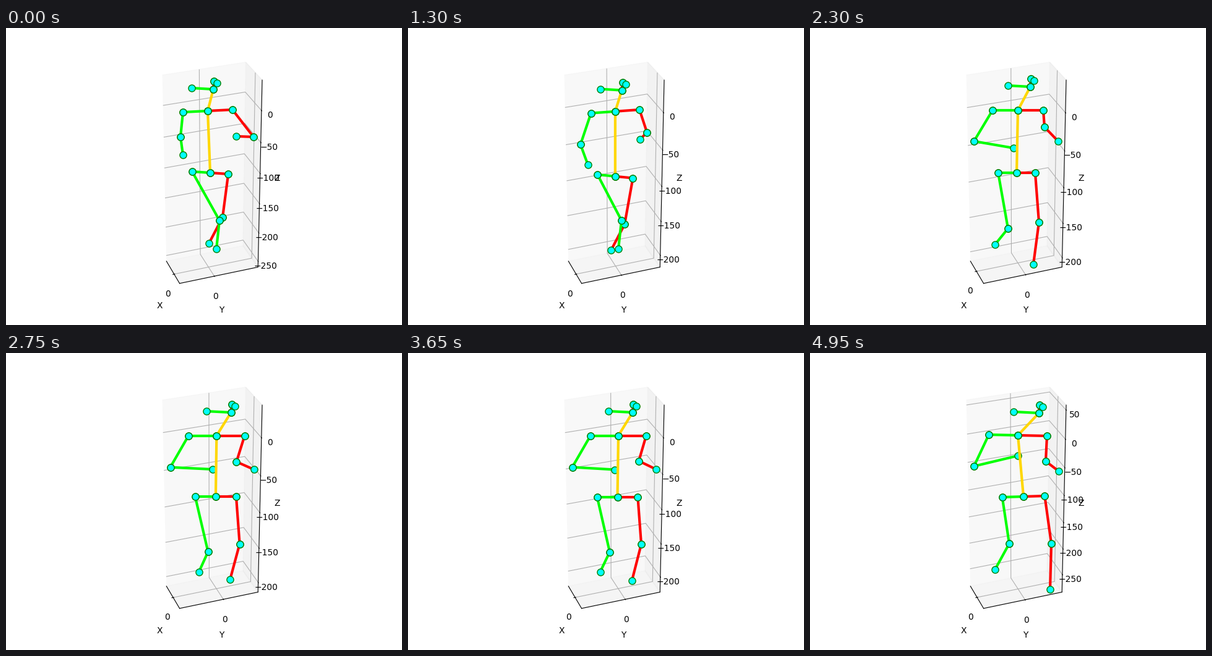
A matplotlib script for the animation above (5 s loop, 640 px wide and 480 px high).

```python
import numpy as np
import matplotlib.pyplot as plt
from matplotlib.animation import FuncAnimation
from matplotlib.lines import Line2D
from matplotlib.ticker import FixedLocator, MultipleLocator
from matplotlib.transforms import Affine2D

W, H, DPI = 640, 480, 100
FRAMES, STEP = 100, 50

plt.rcParams["font.family"] = "DejaVu Sans"

# Key poses in stage pixels, y pointing down. "girdle" is the half width and
# tilt of the shoulders; "zero" is where 0 sits along the x and y axes (0..1).
stride = dict(
    head=(335, 99), neck=(326, 134), hip=(330, 234), girdle=(40, 2),
    l_elbow=(282, 176), l_wrist=(286, 205),
    r_elbow=(400, 176), r_wrist=(372, 175),
    l_knee=(345, 311), l_ankle=(340, 357),
    r_knee=(350, 306), r_ankle=(328, 348), zero=(.59, .438))
lean = stride | dict(
    head=(348, 101), neck=(337, 135), hip=(336, 234), girdle=(39, 3),
    l_elbow=(278, 177), l_wrist=(292, 211),
    r_elbow=(383, 167), r_wrist=(376, 181), zero=(.59, .518))
reach = dict(
    head=(356, 95), neck=(336, 133), hip=(334, 234), girdle=(41, 0),
    l_elbow=(265, 183), l_wrist=(329, 194),
    r_elbow=(379, 160), r_wrist=(401, 183),
    l_knee=(320, 324), l_ankle=(299, 350),
    r_knee=(370, 314), r_ankle=(361, 382), zero=(.465, .53))
twist = dict(
    head=(370, 97), neck=(344, 134), hip=(343, 231), girdle=(49, 0),
    l_elbow=(266, 186), l_wrist=(339, 183),
    r_elbow=(367, 189), r_wrist=(401, 193),
    l_knee=(332, 319), l_ankle=(322, 358),
    r_knee=(384, 304), r_ankle=(363, 353), zero=(.56, .573))
shift = reach | dict(
    head=(370, 97), hip=(345, 232), girdle=(47, -1),
    l_wrist=(336, 166), r_elbow=(381, 175), r_wrist=(402, 191),
    l_knee=(322, 308), r_knee=(390, 308), r_ankle=(388, 382),
    zero=(.51, .524))

DIP_END = 1800
TIMELINE = [(0, stride), (DIP_END, lean), (2300, reach),
            (3150, twist), (4150, reach), (4950, shift)]

# Chains in drawing order.
CHAINS = [
    ("red", "hip r_hip r_knee r_ankle"),
    ("lime", "hip l_hip l_knee l_ankle"),
    ("red", "neck r_shoulder r_elbow r_wrist"),
    ("lime", "neck l_shoulder l_elbow l_wrist"),
    ("gold", "hip neck head"),
    ("lime", "head face"),
    ("red", "head crown ear"),
]


def blend(t):
    """Eased mix of the two key poses around time t."""
    for (t0, a), (t1, b) in zip(TIMELINE, TIMELINE[1:]):
        if t <= t1:
            break
    s = (t - t0) / (t1 - t0)
    s = s * s * (3 - 2 * s)
    return {k: np.array(a[k]) * (1 - s) + np.array(b[k]) * s for k in a}


def pose_at(t):
    pose = blend(t)

    # The opening step sinks and rises again.
    if t < DIP_END:
        drop = np.array([0, 15 * np.sin(np.pi * t / DIP_END)])
        for name in ("l_elbow", "l_wrist", "r_knee", "r_ankle"):
            pose[name] += drop
        pose["hip"] += drop / 2

    # Shoulders, hips and face follow from the spine and the body's turn.
    width, tilt = pose["girdle"]
    for side, sign in (("l", -1), ("r", 1)):
        pose[side + "_shoulder"] = pose["neck"] + (sign * width, -sign * tilt)
        pose[side + "_hip"] = pose["hip"] + (sign * .73 * width, sign * tilt)
    pose["face"] = pose["head"] + (-.87 * width, -2)
    pose["crown"] = pose["head"] + (1, -13)
    pose["ear"] = pose["head"] + (6, -10)
    return pose


def z_limits(t):
    """The height range is smallest mid-loop and widens to both ends."""
    u = (t - 2300) / 1000
    grow = abs(u) ** 3
    return -214 - 3.8 * grow, 41.5 + (.64 + .1 * u) * grow


fig = plt.figure(figsize=(W / DPI, H / DPI), dpi=DPI)
ax = fig.add_subplot(projection="3d")
ax.view_init(elev=30, azim=-20)
ax.set_box_aspect((1, 2, 5))
ax.set(xlabel="X", ylabel="Y", zlabel="Z")
ax.xaxis.set_major_locator(FixedLocator([0]))
ax.yaxis.set_major_locator(FixedLocator([0]))
ax.zaxis.set_major_locator(MultipleLocator(50))

stage = Affine2D().scale(1 / W, -1 / H).translate(0, 1) + fig.transFigure
bones = []
for color, chain in CHAINS:
    names = chain.split()
    for a, b in zip(names, names[1:]):
        line = Line2D([], [], color=color, lw=3, marker="o", ms=8,
                      mfc="cyan", mec="green", mew=1, transform=stage)
        fig.add_artist(line)
        bones.append((line, a, b))


def draw(frame):
    t = frame * STEP
    pose = pose_at(t)
    x0, y0 = pose["zero"]
    ax.set_xlim(-x0, 1 - x0)
    ax.set_ylim(-y0, 1 - y0)
    ax.set_zlim(*z_limits(t))
    for line, a, b in bones:
        line.set_data(*zip(pose[a], pose[b]))
    return [line for line, _, _ in bones]


anim = FuncAnimation(fig, draw, frames=FRAMES, interval=STEP,
                     repeat=True, repeat_delay=0, blit=False)
plt.show()
```
